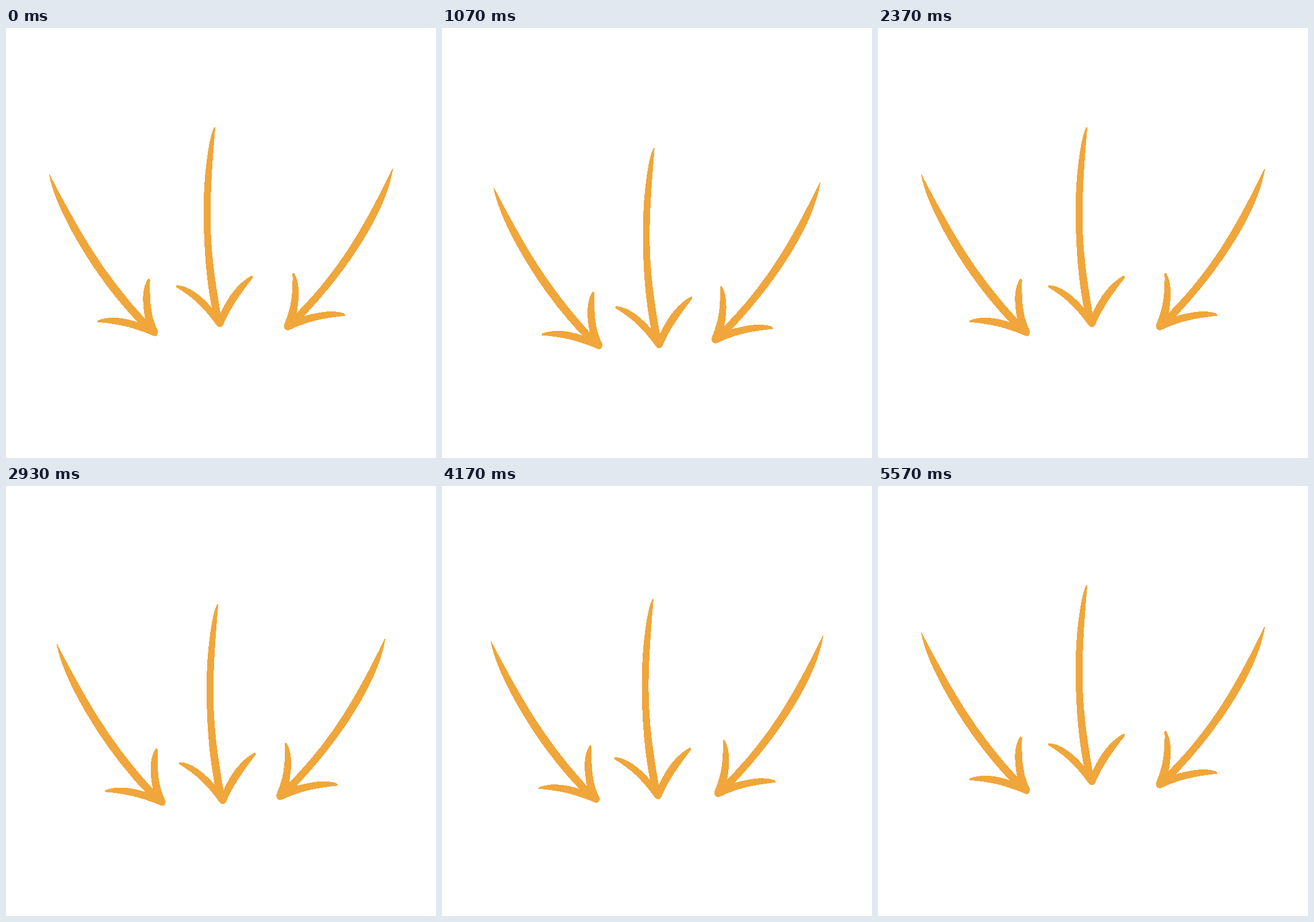
Animation of 748x748 px, one loop 5.61 s. Source, as an HTML page:

```html
<!DOCTYPE html>
<html lang="en">
<head>
<meta charset="utf-8">
<title>Arrows</title>
<style>
  html, body { margin: 0; width: 100%; height: 100%; overflow: hidden; background: #fff; }
  svg { display: block; width: 100%; height: 100%; }
  path {
    fill: #f0a63a; stroke: #f0a63a; stroke-width: 1.2; stroke-linejoin: round;
    shape-rendering: crispEdges;
  }
</style>
</head>
<body>
<svg viewBox="0 0 748 748">
  <path id="left" d="M75.5 255.5C87 313 147 425 231 513C205 504 182 501 160 509L159 511
    C195 514 222 520 257 535Q263 537 264 528C251 503 249 475 250 438L248 436
    C237 452 237 476 243 508C167 426 125 350 75.5 255.5Z"/>
  <path id="middle" d="M363.5 172.5C356 181 344 245 344.5 322C344.5 378 349 438 359 489
    C342 468 317 448 297 448L296 450C322 466 342 482 367 517Q372 523 377 517
    C386 493 404 466 429 434L428 431C404 444 387 466 373 498
    C363 440 355 388 355 325C355 265 361 205 363.5 172.5Z"/>
  <path id="right" d="M672.5 245.5C624 345 580 422 505 497C509 474 512 446 501 427L499 427
    C500 462 497 487 484 517Q484 526 492 525C523 510 551 504 590 500L588 497
    C567 490 545 495 517 502C599 415 661 317 672.5 245.5Z"/>
</svg>
<script>
  const LOOP = 5610;
  const CYCLE = 20;   // 40 ms steps per push
  const PEAK = 9;     // step at which the arrows are furthest in
  const arrows = [
    { id: 'left', dx: 22, dy: 34.3 },
    { id: 'middle', dx: 8.5, dy: 55 },
    { id: 'right', dx: -22, dy: 34.3 }
  ].map(a => ({ ...a, el: document.getElementById(a.id) }));

  // 25 steps per second, shown on a 30 Hz clock rounded to 10 ms.
  function stepAt(ms) {
    const tick = Math.floor((Math.floor(ms / 10) * 3 + 1) / 10);
    return Math.floor(tick * 5 / 6) % CYCLE;
  }

  // Linear push in, linear return, then one step at rest.
  function pushAt(step) {
    return step <= PEAK ? step / PEAK : (CYCLE - 1 - step) / (CYCLE - 1 - PEAK);
  }

  function render(ms) {
    const push = pushAt(stepAt(ms % LOOP));
    for (const { el, dx, dy } of arrows) {
      el.setAttribute('transform', `translate(${dx * push} ${dy * push})`);
    }
  }

  let start;
  function tick(now) {
    start ??= now;
    render(now - start);
    requestAnimationFrame(tick);
  }
  render(0);
  requestAnimationFrame(tick);
</script>
</body>
</html>
```
